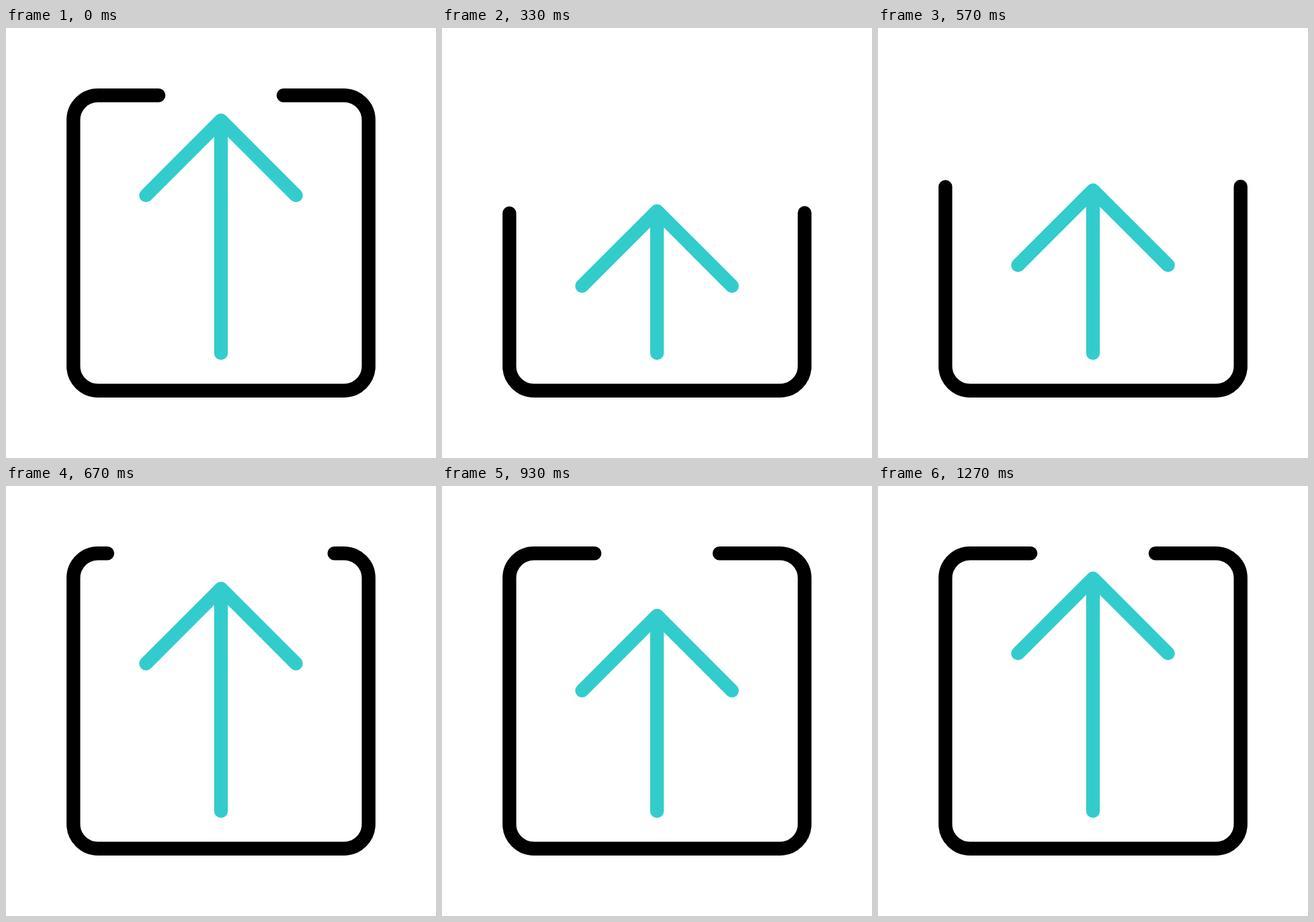
Write an HTML page that moves like this. It is 640 px wide and 640 px high and loops after 2000 ms.

```html
<!DOCTYPE html>
<html lang="en">
<head>
<meta charset="utf-8">
<title>Upload icon</title>
<style>
  html, body { margin: 0; width: 100%; height: 100%; overflow: hidden; background: #fff; }
  svg { display: block; width: 100vw; height: 100vh; }
  path { fill: none; stroke-width: 20.4; stroke-linecap: round; stroke-linejoin: round; }
  #box { stroke: #000; }
  #arrow { stroke: #33cccc; }
</style>
</head>
<body>
<svg viewBox="0 0 640 640">
  <path id="box" d="M227.1 100.3H136.8A36.5 36.5 0 0 0 100.3 136.8V503.2A36.5 36.5 0 0 0 136.8 539.7H503.2A36.5 36.5 0 0 0 539.7 503.2V136.8A36.5 36.5 0 0 0 503.2 100.3H412.9"/>
  <path id="arrow"/>
</svg>
<script>
  const LOOP = 2000, FPS = 30;
  const box = document.getElementById('box');
  const arrow = document.getElementById('arrow');
  const length = box.getTotalLength();

  // [step, value] pairs: share trimmed from each end, and drop of the tip
  const trimKeys = [[0, 0], [14, 0.25], [22, 0]];
  const dropKeys = [[0, 0], [14, 175], [21, 0], [26, 111], [30, 0], [34, 71], [38, 0]];

  // Smoothstep softened by a linear part
  const ease = (u, linear) => linear * u + (1 - linear) * u * u * (3 - 2 * u);

  function valueAt(keys, step, linear) {
    for (let i = 1; i < keys.length; i++) {
      const [a, from] = keys[i - 1];
      const [b, to] = keys[i];
      if (step <= b) return from + (to - from) * ease((step - a) / (b - a), linear);
    }
    return keys[keys.length - 1][1];
  }

  function draw(ms) {
    const step = Math.floor((ms % LOOP + 3.4) * FPS / 1000) % (LOOP * FPS / 1000);

    const trim = length * valueAt(trimKeys, step, 0.487);
    box.style.strokeDasharray = trim ? `${length - 2 * trim} ${length}` : 'none';
    box.style.strokeDashoffset = -trim;

    const tip = 137.5 + valueAt(dropKeys, step, 0.355);
    arrow.setAttribute('d', `M208.4 ${tip + 111.6}L320 ${tip}L431.6 ${tip + 111.6}M320 ${tip}V483.7`);
  }

  const start = performance.now();
  function tick() {
    draw(performance.now() - start);
    requestAnimationFrame(tick);
  }
  tick();
</script>
</body>
</html>
```
